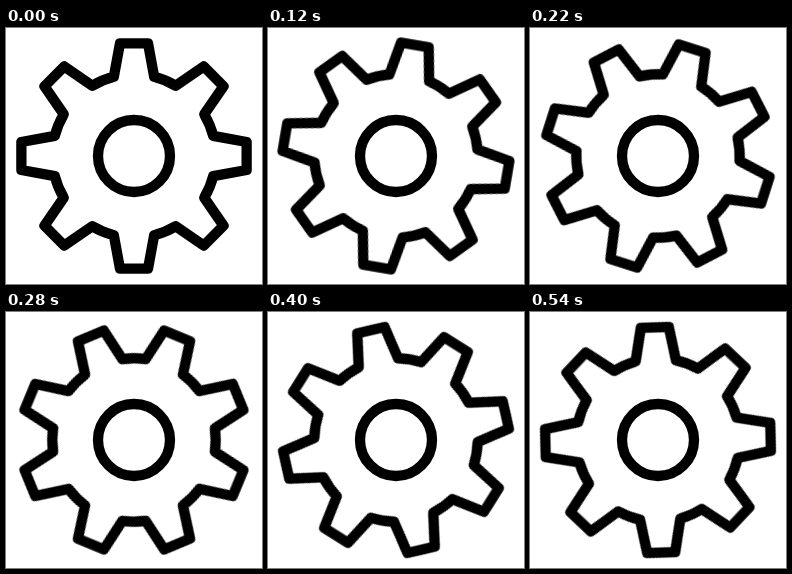
Animation of 256 by 256 pixels, one loop 560 ms. Source, as an HTML page:

```html
<!DOCTYPE html>
<html lang="en">
<head>
<meta charset="utf-8">
<title>Turning gear</title>
<style>
  html, body { margin: 0; width: 100%; height: 100%; overflow: hidden; background: #fff; }
  svg { display: block; width: 100vw; height: 100vh; }
  #gear { transform-origin: 0 0; }
</style>
</head>
<body>
<svg viewBox="-128 -128 256 256" fill="none" stroke="#000" stroke-width="10.3" stroke-linejoin="round">
  <path id="gear"/>
  <circle r="36"/>
</svg>
<script>
const TEETH = 8, STEP = 360 / TEETH;
const LOOP = 560, TICK = 20;
const ROOT = { r: 81.7, a: 14.3 };
const TIP = { r: 113.5, a: 7.1 };

const polar = (r, deg) => {
  const a = deg * Math.PI / 180;
  return `${(r * Math.sin(a)).toFixed(2)} ${(-r * Math.cos(a)).toFixed(2)}`;
};

// Each tooth: arc along the root circle, up to the tip, across and down.
let d = `M${polar(ROOT.r, ROOT.a - STEP)}`;
for (let i = 0; i < TEETH; i++) {
  const mid = i * STEP;
  d += `A${ROOT.r} ${ROOT.r} 0 0 1 ${polar(ROOT.r, mid - ROOT.a)}`
     + `L${polar(TIP.r, mid - TIP.a)}L${polar(TIP.r, mid + TIP.a)}`
     + `L${polar(ROOT.r, mid + ROOT.a)}`;
}
const gear = document.getElementById('gear');
gear.setAttribute('d', d + 'Z');

// One tooth pitch per loop; the small offset keeps ticks off rounding edges.
gear.animate(
  { transform: ['rotate(0deg)', `rotate(${STEP}deg)`] },
  { duration: LOOP, delay: -0.5, iterations: Infinity, easing: `steps(${LOOP / TICK}, end)` }
);
</script>
</body>
</html>
```
